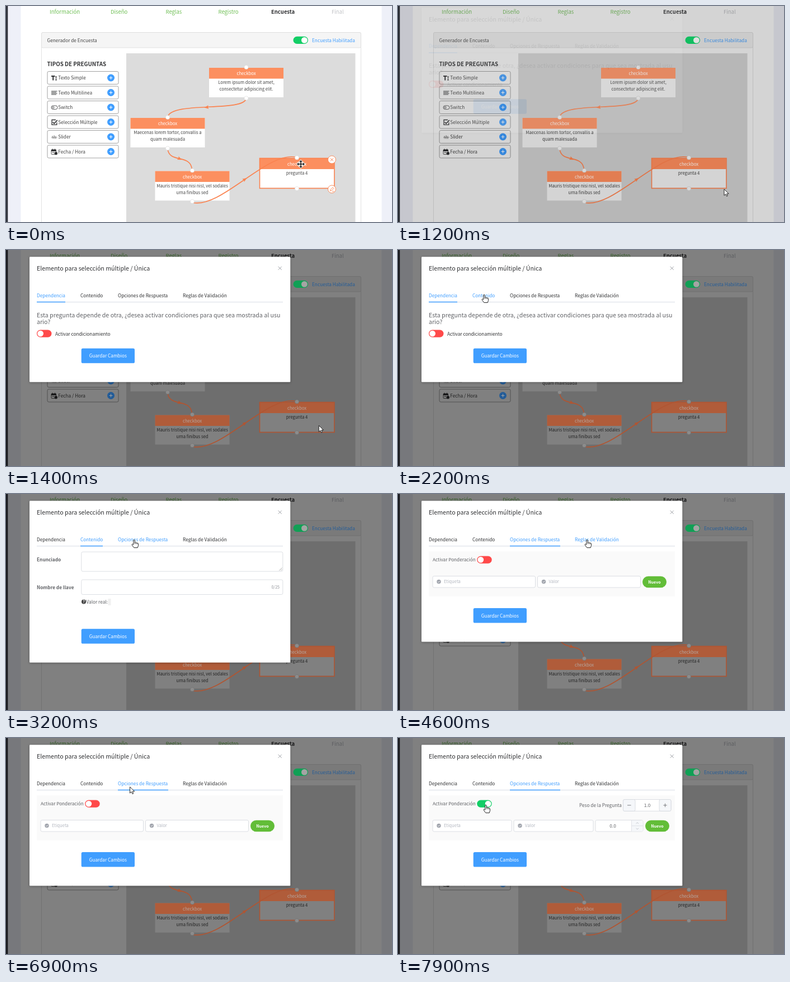
Animation, 690 px wide and 388 px high, one loop 8 s. Source, as an HTML page:

```html
<!DOCTYPE html>
<html lang="es">
<head>
<meta charset="utf-8">
<title>Generador de Encuesta</title>
<style>
html, body { margin: 0; width: 100%; height: 100%; overflow: hidden; }
svg { display: block; width: 690px; height: 388px; }
text { font-family: "Noto Sans CJK JP", "Noto Sans CJK SC", "Noto Sans CJK", "Source Sans Pro", sans-serif; white-space: pre; }
#modal { filter: drop-shadow(0 1px 2px rgba(0,0,0,.3)); }
</style>
</head>
<body>
<svg viewBox="0 0 690 388">
  <g id="page"></g>
  <g id="tools"></g>
  <g id="dim"></g>
  <g id="modal"></g>
  <g id="cursor"></g>
</svg>
<script>
const LOOP = 8000, STEP = 100;
const BLUE = '#409eff', RED = '#ff4949', GREEN = '#13ce66', INK = '#303133', GREY = '#606266';
const el = id => document.getElementById(id);
const clamp = v => Math.max(0, Math.min(1, v));
const ease = v => v * v * (3 - 2 * v);

// Drawing helpers; font sizes are in page pixels, the page is shown at about 2/3.
const text = (x, y, s, px, fill, more = '') =>
  `<text x="${x}" y="${y}" font-size="${(px * 0.591).toFixed(2)}" fill="${fill}" ${more}>${s}</text>`;
const rect = (x, y, w, h, fill, more = '') =>
  `<rect x="${x}" y="${y}" width="${w}" height="${h}" fill="${fill}" ${more}/>`;
const box = (x, y, w, h, stroke, fill = '#fff', r = 2.5) =>
  rect(x, y, w, h, fill, `rx="${r}" stroke="${stroke}" stroke-width=".8"`);
const circle = (x, y, r, fill, more = '') => `<circle cx="${x}" cy="${y}" r="${r}" fill="${fill}" ${more}/>`;
const line = (d, stroke, w = 1, more = '') =>
  `<path d="${d}" fill="none" stroke="${stroke}" stroke-width="${w}" ${more}/>`;
const toggle = (x, y, on, fill, knob = '#fff') =>
  rect(x, y, 26.5, 13.2, fill, 'rx="6.6"') + circle(x + (on ? 19.9 : 6.6), y + 6.6, 5.4, knob);
const MID = 'text-anchor="middle"', BOLD = 'font-weight="700"';

const LIGHT = {
  side: '#eef0f8', bar: '#30343c', paper: '#fff', head: '#f5f5f5', rule: '#dcdcdc', canvas: '#dcdcdc',
  step: '#6fbf55', ink: '#303133', soft: '#444', faint: '#c0c2c6', link: BLUE, green: GREEN, knob: '#fff',
  orange: '#fc8f5f', wire: '#fa8350', frame: '#8a8a8a', port: '#fff', portRim: '#d8d8d8', onOrange: '#fff'
};
const DARK = {
  side: '#77787c', bar: '#181a1e', paper: '#808080', head: '#7a7a7a', rule: '#6e6e6e', canvas: '#6e6e6e',
  step: '#37602a', ink: '#181819', soft: '#222', faint: '#5c5d60', link: '#235c98', green: '#10a055', knob: '#a4a4a4',
  orange: '#b05c3a', wire: '#b05532', frame: '#444', port: '#8c8c8c', portRim: '#707070', onOrange: '#b4a8a2'
};

const TYPES = ['Texto Simple', 'Texto Multilinea', 'Switch', 'Selección Múltiple', 'Slider', 'Fecha / Hora'];
const NODES = [
  [363, 111, 'Lorem ipsum dolor sit amet,', 'consectetur adipiscing elit.'],
  [222.5, 201, 'Maecenas lorem tortor, convallis a', 'quam malesuada'],
  [266.5, 296.5, 'Mauris tristique nisi nisl, vel sodales', 'urna finibus sed'],
  [453.5, 273.5, 'pregunta 4', '']
];

function typeIcon(i, y, c) {
  const k = c.ink;
  return [
    () => line(`M81 ${y - 3}h6.5M84.2 ${y - 3}v7.5`, k, 2) + line(`M88 ${y - 2}h3M89.5 ${y - 2}v6M88 ${y + 4}h3`, k, 1),
    () => line([-3, -1, 1, 3].map((d, n) => `M81 ${y + d + .5}h${n % 2 ? 9 : 10.5}`).join(''), k, .9),
    () => box(81, y - 3, 11, 6.6, k, 'none', 3.3) + circle(84.4, y + .3, 1.6, 'none', `stroke="${k}" stroke-width=".8"`),
    () => line(`M89 ${y - 4}h-7v8.8h8.8v-4`, k, 1.3) + line(`M83.5 ${y}l2.5 2.6 5.8 -6`, k, 1.6),
    () => line(`M81 ${y + 1}h10.5M83 ${y + 3.5}v-5l3 5v-6l3 6v-5`, c.frame, .9),
    () => box(81, y - 3.5, 8.5, 8.5, k, 'none', 1) + rect(81, y - 3.5, 8.5, 3, k) +
      line(`M83 ${y - 5}v2M87.5 ${y - 5}v2M82.5 ${y + 1.5}h4`, k, 1.1) + circle(89.3, y + 3.2, 2.7, k)
  ][i]();
}

function node([x, y, a, b], i, c) {
  const mid = x + 66.5, sel = i === 3;
  return rect(x, y, 133, 53, c.paper) + rect(x, y, 133, 19.5, c.orange) +
    (sel ? rect(x, y, 133.5, 54, 'none', `stroke="${c.wire}" stroke-width="1.6"`) : '') +
    text(mid, y + 13, 'checkbox', 13, c.onOrange, MID) +
    text(mid, y + 29, a, 13, c.soft, MID) + text(mid, y + 41, b, 13, c.soft, MID);
}
const ports = ([x, y], c) => [-1, 54.5].map(d =>
  circle(x + 66.5, y + d, 3.6, c.port, `stroke="${c.portRim}" stroke-width=".6"`)).join('');

function wires(c) {
  const arrow = (x, y, a) => `<path d="M4 0L-3.6 -3.2L-2.4 0L-3.6 3.2Z" fill="${c.wire}" transform="translate(${x} ${y}) rotate(${a})"/>`;
  return line('M429.5 166C425 191 296 171 289 199', c.wire, 1.7) + arrow(358.5, 182, 172) +
    line('M289 257C292 283 330 265 332.5 294', c.wire, 1.7) + arrow(310.5, 274.5, 25) +
    line('M333 353C385 365 468 258 520 272', c.wire, 1.7) + arrow(427, 311.3, -35);
}

function scene(c) {
  let s = rect(0, 0, 690, 388, c.side) + rect(0, 0, 3.3, 388, c.bar) + rect(26.5, 0, 645, 388, c.paper);
  [['Información', 78], ['Diseño', 187], ['Reglas', 285.5], ['Registro', 379.5]].forEach(([n, x]) => s += text(x, 13.5, n, 16, c.step));
  s += text(474, 13.5, 'Encuesta', 16, c.ink, BOLD) + text(582, 13.5, 'Final', 16, c.faint);
  s += box(63.5, 47.5, 571, 360, c.rule, c.paper) + box(63.5, 47.5, 571, 27.5, c.rule, c.head);
  s += text(73.5, 65, 'Generador de Encuesta', 14, c.soft) + toggle(513.5, 54.8, true, c.green, c.knob);
  s += text(547, 65, 'Encuesta Habilitada', 14, c.link);
  s += text(73.5, 108, 'TIPOS DE PREGUNTAS', 16.5, c.ink, BOLD);
  TYPES.forEach((n, i) => {
    const y = 129 + i * 26.5;
    s += box(74, y - 11.5, 127, 23, c.frame, c.paper) + typeIcon(i, y, c) + text(93.3, y + 3.4, n, 14, c.soft) +
      circle(187.5, y, 6.5, c.link) + line(`M184.6 ${y}h5.8M187.5 ${y - 2.9}v5.8`, c.knob, 1);
  });
  s += rect(215, 85, 409.5, 303, c.canvas);
  s += NODES.map((n, i) => node(n, i, c)).join('') + wires(c) + NODES.map(n => ports(n, c)).join('');
  return s;
}

function nodeTools() {
  const o = LIGHT.wire, rim = `stroke="${o}" stroke-width=".9"`;
  return circle(582.5, 276, 7, '#fff', rim) + line('M580 273.5l5 5m0 -5l-5 5', o, 1) +
    circle(582.5, 329, 7, '#fff', rim) + line('M579.5 332l.6 -2.3 4 -4 1.8 1.8 -4 4zM583 333h3.5', o, .9);
}

// Dialog tabs: label, left, width of underline, dialog height.
const TABS = [
  ['Dependencia', 55, 51, 225], ['Contenido', 133, 40, 290.5],
  ['Opciones de Respuesta', 200, 90, 253.3], ['Reglas de Validación', 316, 79, 261]
];
const CLICKS = [[0, 0], [2400, 1], [3400, 2], [4800, 3], [6400, 2]];
const HOVERS = [[2000, 2800, 1], [3100, 4400, 2], [4600, 5200, 3], [6200, 6800, 2]];
const WEIGHT_AT = 7600;
const RIM = '#d4d7de', HINT = '#b4b8c0';

const field = (x, w, label) => box(x, 147.5, w, 20.5, RIM) + circle(x + 11, 157.4, 3.7, '#a0a4ac') +
  line(`M${x + 9.3} 157.5l1.3 1.3 2.4 -2.6`, '#fff', .9) + text(x + 20, 160.4, label, 13, HINT);
const pill = x => rect(x, 147.7, 43, 20.6, '#62bd38', 'rx="10.3"') + text(x + 21.5, 160.7, 'Nuevo', 12, '#fff', MID + ' ' + BOLD);
const radio = (x, w, on, label) => box(x, 151, w, 20.5, on ? BLUE : RIM) +
  circle(x + 11.3, 161.2, 4, on ? BLUE : '#fff', `stroke="${on ? BLUE : RIM}" stroke-width=".7"`) +
  (on ? circle(x + 11.3, 161.2, 1.5, '#fff') : '') + text(x + 22, 164.5, label, 12, on ? BLUE : GREY);

function weightFields() {
  return text(324, 123.7, 'Peso de la Pregunta', 14, GREY) + box(402.5, 110.5, 85.5, 20.8, RIM) +
    box(402.5, 110.5, 21.5, 20.8, RIM, '#f5f7fa') + box(467, 110.5, 21, 20.8, RIM, '#f5f7fa') +
    line('M410 120.8h6.5M474.3 120.8h6.5M477.5 117.6v6.5', GREY, .8) + text(445.5, 124, '1.0', 14, GREY, MID) +
    field(62, 141, 'Etiqueta') + field(207, 142, 'Valor') + box(353, 147.5, 85, 20.5, RIM) +
    rect(417.5, 148, 20, 19.6, '#f5f7fa') + line('M417.5 148v19.5M417.5 157.8h20.5', RIM, .7) +
    line('M425.6 153.8l2.2 -2 2.2 2M425.6 162l2.2 2 2.2 -2', HINT, .8) + text(384, 160.9, '0.0', 14, GREY, MID) + pill(442);
}

const PANES = [
  () => text(55, 120.6, 'Esta pregunta depende de otra, ¿desea activar condiciones para que sea mostrada al usu', 18, GREY) +
    text(55, 133, 'ario?', 18, GREY) + toggle(55, 143.5, false, RED) + text(88, 153.6, 'Activar condicionamiento', 14, INK),
  () => text(55, 120.5, 'Enunciado', 14, GREY, BOLD) + box(134.8, 104, 360, 35, RIM) +
    line('M488.5 137.5l5 -5M491.5 137.5l2 -2', '#888', .7) +
    text(55, 170.6, 'Nombre de llave', 14, GREY, BOLD) + box(134.8, 154, 360, 26.5, RIM) +
    text(489, 170.3, '0/25', 12, '#909399', 'text-anchor="end"') + circle(139, 193.6, 4, '#444') +
    text(139, 196.2, '?', 12, '#fff', MID + ' ' + BOLD) + text(143.5, 197, 'Valor real:', 14, GREY) + rect(182.5, 188, 5, 12, '#f0f0f0'),
  t => {
    const on = t >= WEIGHT_AT;
    return rect(55, 103, 440, 81, '#fafafa') + text(62, 120.8, 'Activar Ponderación', 13.9, GREY) +
      toggle(141.2, 111.5, on, on ? GREEN : RED) +
      (on ? weightFields() : field(62, 183.5, 'Etiqueta') + field(249.5, 184, 'Valor') + pill(437));
  },
  () => text(55, 120.5, 'Requerido', 14, GREY, BOLD) + toggle(161, 111.5, true, BLUE) +
    text(55, 165, 'Tipo de Elemento', 14, GREY, BOLD) + radio(161, 90.5, true, 'Seleccón Múltiple') + radio(278.3, 85.5, false, 'Única respuesta')
];

function dialog(t) {
  const n = CLICKS.filter(c => t >= c[0]).length - 1;
  const [since, tab] = CLICKS[n];
  const from = TABS[n ? CLICKS[n - 1][1] : 0], [, x, w, h] = TABS[tab];
  const hover = HOVERS.find(([a, b]) => t >= a && t < b);
  const k = n ? ease(clamp((t - since + STEP) / 300)) : 1;
  const mix = (a, b) => a + (b - a) * k;
  let s = rect(42, 12.3, 466.3, h, '#fff', 'rx="1.3"');
  s += text(55, 37.4, 'Elemento para selección múltiple / Única', 18, INK);
  s += line('M486.7 29.7l6 6m0 -6l-6 6', '#909399', .9) + rect(55, 92.9, 440, 1.3, '#dfe3ea');
  TABS.forEach(([name, tx], i) => s += text(tx, 84.7, name, 14, i === tab || hover && hover[2] === i ? BLUE : INK));
  s += rect(mix(from[1], x), 92.7, mix(from[2], w), 1.5, BLUE);
  const by = 12.3 + h - 60.5;
  s += PANES[tab](t) + rect(134.7, by, 95.3, 26.5, BLUE, 'rx="2.6"') + text(182.3, by + 16.5, 'Guardar Cambios', 14, '#fff', MID);
  return s;
}

// Pointer stops: time, x, y.
const PATH = [
  [0, 527, 284], [300, 527, 284], [1100, 583, 329], [1300, 583, 329], [2000, 154, 80], [2800, 154, 80],
  [3200, 229, 82], [4300, 229, 82], [4600, 338, 82], [5200, 338, 82], [5700, 152, 124], [5900, 152, 124],
  [6100, 223, 97], [6200, 229, 84], [6800, 229, 84], [7300, 157, 120], [8000, 157, 120]
];
const ARROW = '<path d="M0 0V11.3L2.7 8.9L4.5 12.8L6.3 12L4.6 8.2H8.2Z" fill="#fff" stroke="#111" stroke-width=".9" stroke-linejoin="round"/>';
const HAND = '<path d="M-1.2 1Q0 -1 1.2 1V5.2Q2.5 4 3.5 5.6Q5 4.8 5.7 6.2Q7.3 5.6 7.5 7.5V10.5L6.2 14.5H-.2L-3.8 9.6Q-4.2 7.6 -2.6 8L-1.2 9.2Z" fill="#fff" stroke="#111" stroke-width=".9" stroke-linejoin="round"/>' +
  line('M1.2 5V8M3.5 5.8V8M5.7 6.4V8.4', '#111', .7);
const tip = [0, 90, 180, 270].map(a => `<path d="M0 -7L2.8 -4H.8V0H-.8V-4H-2.8Z" transform="rotate(${a})"/>`).join('');
const MOVE = `<g fill="#fff" stroke="#fff" stroke-width="1.8">${tip}</g><g fill="#222">${tip}</g>`;

function pointer(t) {
  const i = Math.max(1, PATH.findIndex(p => p[0] > t));
  const [t0, x0, y0] = PATH[i - 1], [t1, x1, y1] = PATH[i];
  const k = ease((t - t0) / (t1 - t0));
  const over = HOVERS.some(([a, b]) => t >= a && t < b) || t >= 7200 || (t >= 900 && t < 1200);
  const shape = t < 900 ? MOVE : over ? HAND : ARROW;
  return `<g transform="translate(${x0 + (x1 - x0) * k} ${y0 + (y1 - y0) * k})">${shape}</g>`;
}

function render(t) {
  const open = clamp((t - 1150) / 250);
  el('tools').style.display = t < 1200 ? '' : 'none';
  el('dim').setAttribute('opacity', clamp((t - 1150) / 150));
  el('modal').setAttribute('opacity', Math.pow(open, 1.5));
  el('modal').setAttribute('transform', `translate(0 ${-12 * (1 - open)})`);
  el('modal').innerHTML = open ? dialog(t) : '';
  el('cursor').innerHTML = pointer(t);
}

el('page').innerHTML = scene(LIGHT);
el('dim').innerHTML = scene(DARK);
el('tools').innerHTML = nodeTools();

const start = performance.now();
let shown = -1;
function tick() {
  const t = Math.floor(((performance.now() - start) % LOOP) / STEP) * STEP;
  if (t !== shown) render(shown = t);
  requestAnimationFrame(tick);
}
tick();
</script>
</body>
</html>
```
